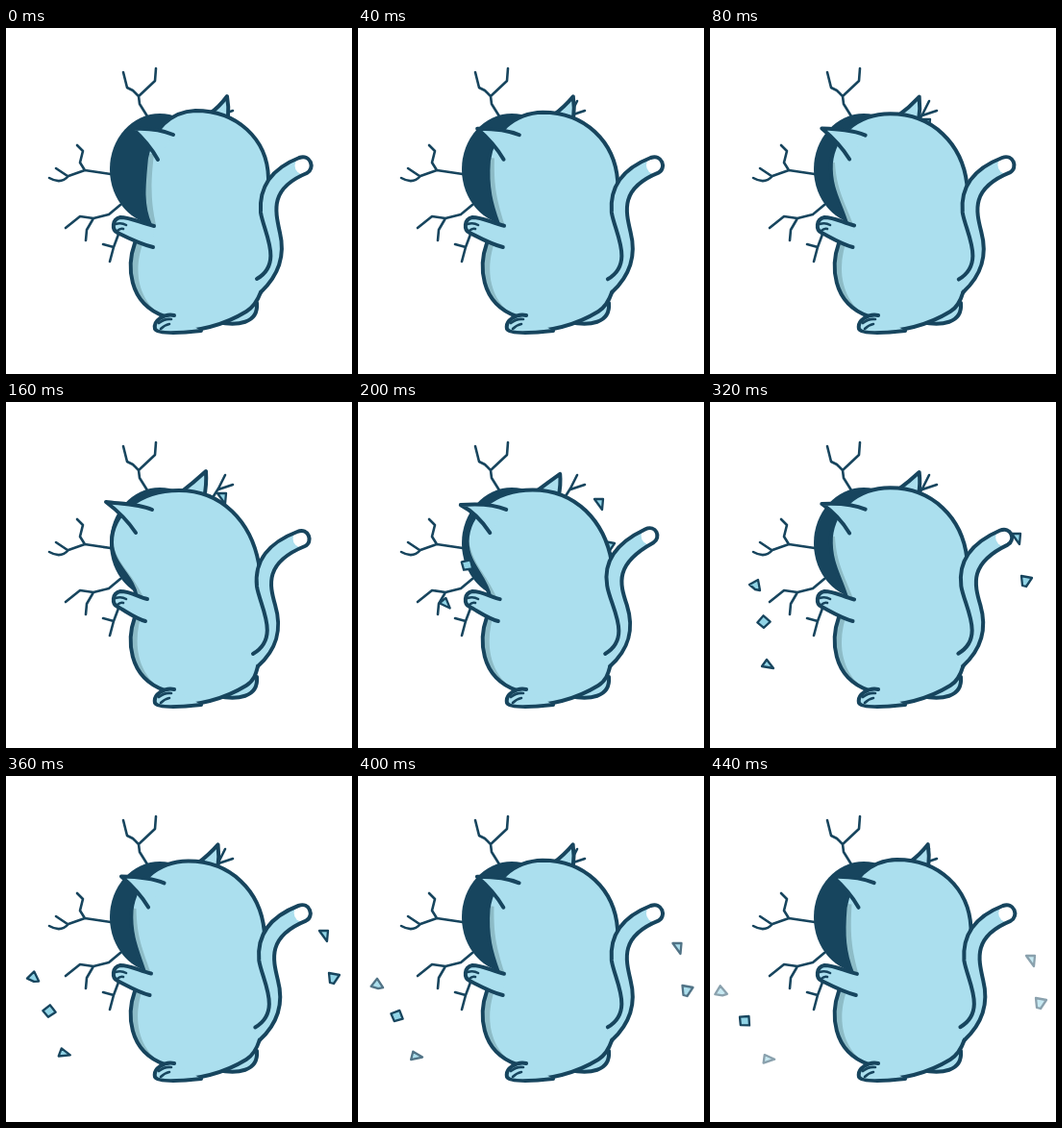
Write an HTML page that moves like this. It is 360 by 360 pixels and loops after 480 ms.

```html
<!DOCTYPE html>
<html lang="en">
<head>
<meta charset="utf-8">
<title>Cat and wall</title>
<style>
  html, body { margin: 0; width: 100%; height: 100%; overflow: hidden; background: #fff; }
  svg { display: block; width: 100vw; height: 100vh; }
  .ink { fill: none; stroke: #17455e; stroke-width: 4; stroke-linecap: round; stroke-linejoin: round; }
  .fur { fill: #abdfee; }
  .thin { stroke-width: 2.6; }
  .shard { fill: #91d4e6; stroke-width: 2.3; }
</style>
</head>
<body>
<svg viewBox="0 0 360 360">
  <defs>
    <path id="body"/>
    <path id="tail"/>
    <clipPath id="inBody"><use href="#body"/></clipPath>
    <clipPath id="inTail"><use href="#tail"/></clipPath>
  </defs>

  <g class="ink thin">
    <path d="M149 95L139 79L138 71L132 65L126 62L122 46M138 71L155 55L156 42"/>
    <path d="M109 152L82 148L65 154Q57 163 45 156M52 146L64 154M82 148L77 140L80 128L74 122"/>
    <path d="M119 184L107 194L91 198L77 196L62 208M91 198L84 210L83 221"/>
    <path d="M118 212L112 228L108 243M112 228L101 225"/>
    <path d="M214 101L221 90L228 76M221 91L236 86"/>
  </g>
  <ellipse cx="160" cy="147" rx="52" ry="58" fill="#17455e"/>
  <g id="shards"></g>

  <path class="ink fur" d="M220 306C240 310 263 308 261 286"/>
  <path class="ink fur" id="earR"/>
  <use href="#body" class="fur"/>
  <path id="shade" fill="#8dbcc7" clip-path="url(#inBody)"/>
  <use href="#body" class="ink"/>
  <path class="ink fur" id="earL"/>

  <use href="#tail" class="fur"/>
  <g clip-path="url(#inTail)"><circle id="tip" r="9.5" fill="#fff"/></g>
  <use href="#tail" class="ink"/>

  <path class="ink fur" id="arm"/>
  <path class="ink thin" d="M114 204Q120 202 125 205M116 211Q119 208 122 209"/>
  <path class="ink fur" d="M175 299C165 297 153 304 155 313C157 318 175 318 203 315"/>
  <path class="ink thin" d="M159 307Q165 302 172 303M161 313Q165 309 170 308"/>
</svg>
<script>
const LOOP = 480, STEP = 40;
const $ = id => document.getElementById(id);
const lerp = (a, b, t) => a + (b - a) * t;

// Blends two paths that share the same commands
function blend(a, b, t) {
  const nums = b.match(/-?[\d.]+/g);
  let i = 0;
  return a.replace(/-?[\d.]+/g, n => lerp(+n, +nums[i++], t).toFixed(2));
}

// Keys are rows of [time, value, value...]
function at(keys, t) {
  let i = 1;
  while (i < keys.length - 1 && keys[i][0] < t) i++;
  const a = keys[i - 1], b = keys[i];
  const k = Math.min(1, Math.max(0, (t - a[0]) / (b[0] - a[0])));
  return a.slice(1).map((v, j) => lerp(v, b[j + 1], k));
}

const lean = [[0, 0], [80, .56], [160, 1], [240, .8], [320, .56], [360, .43], [440, .15], [480, 0]];
const recoil = [[0, 0], [160, 0], [240, 1], [320, .25], [360, 0], [480, 0]];

// Each part: upright pose, then head against the wall
const parts = {
  body: [
    "M134 224C126 246 126 286 165 300L165 316C205 317 232 306 250 295C258 290 262 283 265 275C282 250 280 230 274 200C270 180 273 170 273 156C272 115 240 86 197 86C172 87 152 105 146 135C143 165 141 185 150 205C146 212 138 215 134 224Z",
    "M134 224C126 246 126 286 165 300L165 316C205 317 232 306 250 295C258 290 260 283 262 275C277 250 276 230 270 205C265 190 264 182 263 168C255 125 225 92 180 92C137 92 110 118 110 146C110 170 132 180 136 203C138 212 136 215 134 224Z"
  ],
  shade: [
    "M120 130L154 131C150 165 151 182 156 205L146 215C130 250 136 286 168 303L120 303Z",
    "M100 140L111 147C118 172 130 176 143 203L143 215C130 250 136 286 168 303L100 303Z"
  ],
  arm: [
    "M154 206C140 203 130 197 119 197C110 199 110 210 116 213C124 217 140 225 153 228",
    "M147 205C138 203 130 197 119 197C110 199 110 210 116 213C124 217 134 225 145 228"
  ]
};

const tails = [
  "M265 275C283 258 291 238 285 213C280 190 274 167 313 151C322 146 317 131 305 135C277 146 263 165 265 192C268 212 289 245 261 261",
  "M262 275C281 258 288 238 280 211C274 190 269 167 311 150C320 146 315 130 303 135C274 146 258 165 261 192C264 212 286 245 257 262",
  "M262 275C281 258 288 238 279 211C269 186 265 170 303 143C312 136 305 124 294 130C266 146 251 165 257 190C260 212 286 245 257 262"
];

// Keys: time, x, y, turn
const right = [[160, 225, 100, 0], [240, 277, 112, 0], [320, 319, 142, 0], [360, 331, 166, 0], [440, 334, 192, 0]];
const shards = [
  { d: "M-5 -5L4 -5L3 6Z", keys: right, from: 80, fade: true },
  { d: "M-5 -5L6 -3L0 6L-4 5Z", keys: right.map(([t, x, y, r]) => [t, x + 10, y + 44, r]), from: 80, fade: true },
  { d: "M-6 -1L3 -6L5 5L0 4Z", from: 200, fade: true,
    keys: [[160, 160, 120, 30], [240, 101, 154, 20], [320, 47, 191, 0], [360, 28, 210, -15], [440, 11, 225, -30]] },
  { d: "M-6 -3L3 -6L6 3L-3 5Z", from: 200,
    keys: [[160, 135, 150, 10], [240, 92, 190, 0], [320, 56, 229, -30], [360, 45, 245, -20], [440, 36, 255, 15]] },
  { d: "M-6 2L-1 -5L6 4Z", from: 200, fade: true,
    keys: [[160, 105, 185, 20], [240, 77, 233, 12], [320, 60, 273, 0], [360, 60, 288, -15], [440, 60, 294, -28]] }
];
for (const s of shards) {
  s.el = document.createElementNS("http://www.w3.org/2000/svg", "path");
  s.el.setAttribute("class", "ink shard");
  s.el.setAttribute("d", s.d);
  $("shards").append(s.el);
}

function draw(now) {
  const t = Math.floor(now % LOOP / STEP) * STEP;
  const [q] = at(lean, t), [k] = at(recoil, t);
  const set = (id, d) => $(id).setAttribute("d", d);

  for (const id in parts) set(id, blend(...parts[id], q));
  set("tail", blend(blend(tails[0], tails[1], q), tails[2], k));

  const drop = 6 * k;
  set("earL", blend(
    `M174 111C162 106 148 104 132 ${105 + drop}C143 115 152 126 158 137`,
    `M152 112C138 106 120 106 104 ${104 + drop}C116 113 127 124 135 136`, q));
  set("earR", blend(
    `M212 89Q222 82 230 ${71 + drop}Q232 82 231 93`,
    `M183 93Q195 84 208 ${72 + drop}Q209 86 206 100`, q));

  $("tip").setAttribute("cx", lerp(310 - 2 * q, 300, k));
  $("tip").setAttribute("cy", lerp(143 - q, 136, k));

  for (const s of shards) {
    const [x, y, turn] = at(s.keys, t);
    s.el.setAttribute("transform", `translate(${x} ${y}) rotate(${turn})`);
    s.el.style.opacity = t < s.from ? 0 : s.fade ? 1 - .5 * Math.max(0, t - 360) / 80 : 1;
  }
}

function tick() {
  draw(performance.now());
  requestAnimationFrame(tick);
}
tick();
</script>
</body>
</html>
```
